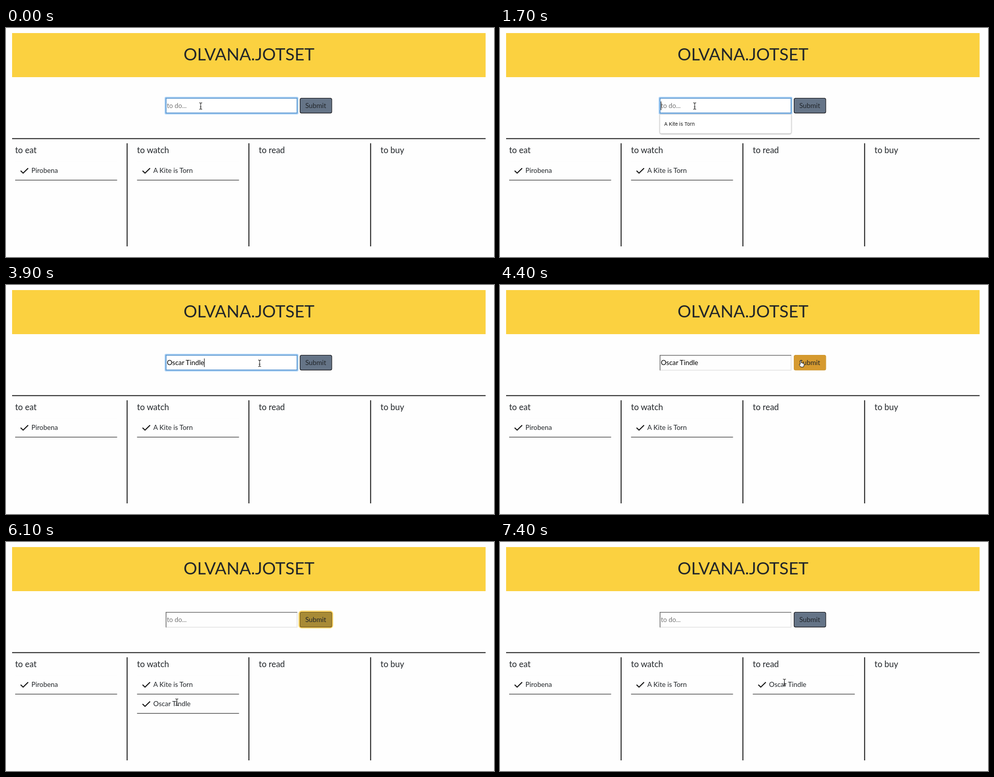
An HTML page that plays this animation: 960 px wide and 452 px high, repeating every 7.5 s.

```html
<!DOCTYPE html>
<html lang="en">
<head>
<meta charset="utf-8">
<title>To-do list</title>
<style>
  html, body { margin: 0; width: 100%; height: 100%; overflow: hidden; background: #fefefe; }
  svg { display: block; width: 960px; height: 452px; font-family: Lato, "Open Sans", sans-serif; }
  text { fill: #212529; }
  .title { font-size: 33.5px; text-anchor: middle; }
  .heading { font-size: 16.5px; }
  .label { font-size: 13.4px; }
  .hint { fill: #757575; font-size: 12.9px; }
  .typed { fill: #000; }
  .suggest { font: 9.6px Inter, sans-serif; fill: #111; }
  .rule { stroke: #111; stroke-width: 1.8; }
  .thin { stroke: #111; stroke-width: 1.1; }
  .check { fill: none; stroke: #111; stroke-width: 1.9; }
  .menu { fill: #fff; stroke: #ccc; stroke-width: .8; filter: drop-shadow(0 1px 1px #0004); }
  .arrow { fill: #000; stroke: #fff; stroke-width: .8; }
  .hand { fill: #fff; stroke: #111; stroke-width: 1; stroke-linejoin: round; }
  .beam { fill: none; stroke: #222; stroke-width: 1.1; }
</style>
</head>
<body>
<svg viewBox="0 0 960 452">
  <rect x="12" y="10" width="931.5" height="87" fill="#fbd140"/>
  <text class="title" x="478" y="64.3">OLVANA.JOTSET</text>

  <g id="blurred" fill="none" stroke-width="1.6">
    <path d="M314.8 168.2H572.6V138.5" stroke="#e4e4e4"/>
    <path d="M314.8 168.6V138.8H573" stroke="#777"/>
  </g>
  <g id="focused">
    <rect x="313.6" y="137.4" width="260" height="31.6" rx="1.5" fill="none" stroke="#b2d5f6" stroke-width="3.4"/>
    <rect x="314.8" y="138.6" width="257.8" height="29.2" fill="#fff" stroke="#5b98d2" stroke-width="1.8"/>
  </g>
  <text id="hint" class="hint" x="316.5" y="157.7">to do...</text>
  <text id="typed" class="label typed" x="316.5" y="157.7"></text>
  <rect id="caret" y="145" width="1" height="17" fill="#000"/>

  <rect id="glow" x="577" y="137" width="65" height="32" rx="4.5" fill="none" stroke="#fdd565" stroke-width="3.2"/>
  <rect id="button" x="578.5" y="138.5" width="62.4" height="29.4" rx="3" stroke-width="1.1"/>
  <text class="label" x="588.7" y="157.7">Submit</text>

  <g id="menu">
    <path class="menu" d="M314.4 170.5H573V205.5Q573 208.3 570 208.3H317.4Q314.4 208.3 314.4 205.5Z"/>
    <text class="suggest" x="323" y="192.5">A Kite is Torn</text>
  </g>

  <path class="rule" d="M12 218.4H943.5"/>
  <g id="columns"></g>
  <g id="items"></g>

  <g id="cursor">
    <path id="arrow" class="arrow" d="M0 0V10.6L2.4 8.4L4.1 12.2L5.9 11.4L4.3 7.7L7.6 7.5Z"/>
    <path id="hand" class="hand" d="M-2.4 1.8V-4.8Q-2.4 -6 -1.3 -6T-.1 -4.8V-1.2Q1 -2.2 1.9 -.7Q3.1 -1.6 3.8 -.1Q5.2 -.6 5.2 .9V3.4L3.9 7H-1.3L-4.4 2.4Q-4.6 .6 -2.4 1.8Z"/>
    <path id="beam" class="beam" d="M-2.8 -6.4Q0 -6.4 0 -4.8Q0 -6.4 2.8 -6.4M0 -4.8V4.8M-2.8 6.4Q0 6.4 0 4.8Q0 6.4 2.8 6.4M-1.5 1.8H1.5"/>
  </g>
</svg>
<script>
const LOOP = 7500;
const ENTRY = "Oscar Tindle";
const MENU_OPEN = 900, TYPE_START = 2000, KEY_GAP = 115, MOUSE_BACK = 3500;
const PRESS = 4380, ADDED = 4500, GRAB = 6150, DROP = 7000;
const COLUMN_X = [18, 257.8, 497.3, 736.8];

const $ = id => document.getElementById(id);
const show = (id, on) => $(id).style.display = on ? "" : "none";
const clamp = v => Math.min(1, Math.max(0, v));
const lerp = (a, b, u) => a + (b - a) * u;
const ramp = (t, start, length = 150) => smooth(clamp((t - start) / length));

const smooth = u => u * u * (3 - 2 * u);
const easeIn = u => u * u;
const easeOut = u => u * (2 - u);

// time, x, y, easing towards this point
const path = [
  [0, 383, 154],
  [MOUSE_BACK, 383, 154, smooth],
  [4250, 593, 155, smooth],
  [4750, 593, 155, smooth],
  [5400, 434, 260, easeIn],
  [5900, 336, 316, easeOut],
  [GRAB, 336, 316, smooth],
  [6600, 533, 289, smooth],
  [6900, 559.5, 277, easeOut],
  [LOOP, 559.5, 277, smooth]
];

function mouseAt(t) {
  const i = path.findIndex(p => p[0] > t);
  const [t0, x0, y0] = path[i - 1], [t1, x1, y1, ease] = path[i];
  const u = ease((t - t0) / (t1 - t0));
  return [lerp(x0, x1, u), lerp(y0, y1, u)];
}

// Each state fades in over the previous one: time, fill, border
const buttonStates = [
  [-999, [101, 116, 135], [17, 17, 20]],
  [4100, [214, 154, 47], [207, 150, 45]],
  [4880, [168, 139, 54], [112, 88, 28]],
  [GRAB, [101, 116, 135], [17, 17, 20]]
];

function buttonColour(t, part) {
  let colour = buttonStates[0][part];
  for (const state of buttonStates) {
    const u = ramp(t, state[0]);
    colour = colour.map((c, i) => lerp(c, state[part][i], u));
  }
  return `rgb(${colour.map(Math.round)})`;
}

function itemMarkup(label, x, y, id = "") {
  return `<g id="${id}" transform="translate(${x} ${y})">
    <rect y="-37" width="200.6" height="37" fill="#fefefe"/>
    <path class="check" d="M10.8 -18.6L15.7 -13.8L25.6 -23.6"/>
    <text class="label" x="32" y="-14.8">${label}</text>
    <path class="thin" d="M0 0H200.6"/></g>`;
}

$("columns").innerHTML = ["eat", "watch", "read", "buy"].map((name, i) =>
  `<text class="heading" x="${COLUMN_X[i]}" y="246.8">to ${name}</text>` +
  (i ? `<path class="rule" d="M${COLUMN_X[i] - 19.5} 227.5V431"/>` : "")).join("");

$("items").innerHTML =
  itemMarkup("Pirobena", COLUMN_X[0], 300.3) +
  itemMarkup("A Kite is Torn", COLUMN_X[1], 300.3) +
  itemMarkup(ENTRY, COLUMN_X[1], 338.3, "entry");

function drawField(t) {
  const focus = t < PRESS;
  const keys = Math.floor((t - TYPE_START) / KEY_GAP) + 1;
  const text = t < ADDED ? ENTRY.slice(0, Math.max(0, keys)) : "";
  const typing = keys > 0 && keys <= ENTRY.length;
  show("focused", focus);
  show("blurred", !focus);
  show("hint", !text);
  $("typed").textContent = text;
  show("caret", focus && (typing || t % 1000 >= 500));
  $("caret").setAttribute("x", 316.3 + (text ? $("typed").getComputedTextLength() : 0));
  show("menu", t >= MENU_OPEN && t < TYPE_START);
}

function drawButton(t) {
  $("button").setAttribute("fill", buttonColour(t, 1));
  $("button").setAttribute("stroke", buttonColour(t, 2));
  $("glow").setAttribute("opacity", ramp(t, PRESS + 40) - ramp(t, GRAB));
}

function drawEntry(t) {
  const [mx, my] = mouseAt(Math.min(t, DROP));
  const held = t >= GRAB;
  let x = COLUMN_X[1] + (held ? mx - 336 : 0);
  let y = 338.3 + (held ? my - 316 : 0);
  const settle = ramp(t, DROP);
  x = lerp(x, COLUMN_X[2], settle);
  y = lerp(y, 300.3, settle);
  show("entry", t >= ADDED);
  $("entry").setAttribute("transform", `translate(${x} ${y})`);
}

function cursorShape(t, x, y) {
  if (t >= GRAB && t < DROP) return "arrow";
  const inside = (l, r, top, bottom) => x > l && x < r && y > top && y < bottom;
  if (inside(578, 641, 138, 168)) return "hand";
  if (inside(314, 573, 138, 168)) return "beam";
  if (inside(290, 371, 272, 326) || inside(529, 602, 272, 290)) return "beam";
  return "arrow";
}

function drawCursor(t) {
  const [x, y] = mouseAt(t);
  const shape = cursorShape(t, x, y);
  show("cursor", t < TYPE_START || t >= MOUSE_BACK);
  for (const id of ["arrow", "hand", "beam"]) show(id, id === shape);
  $("cursor").setAttribute("transform", `translate(${x} ${y})`);
}

const start = performance.now();
function render() {
  const t = Math.max(0, performance.now() - start) % LOOP;
  drawField(t);
  drawButton(t);
  drawEntry(t);
  drawCursor(t);
  requestAnimationFrame(render);
}
render();
</script>
</body>
</html>
```
